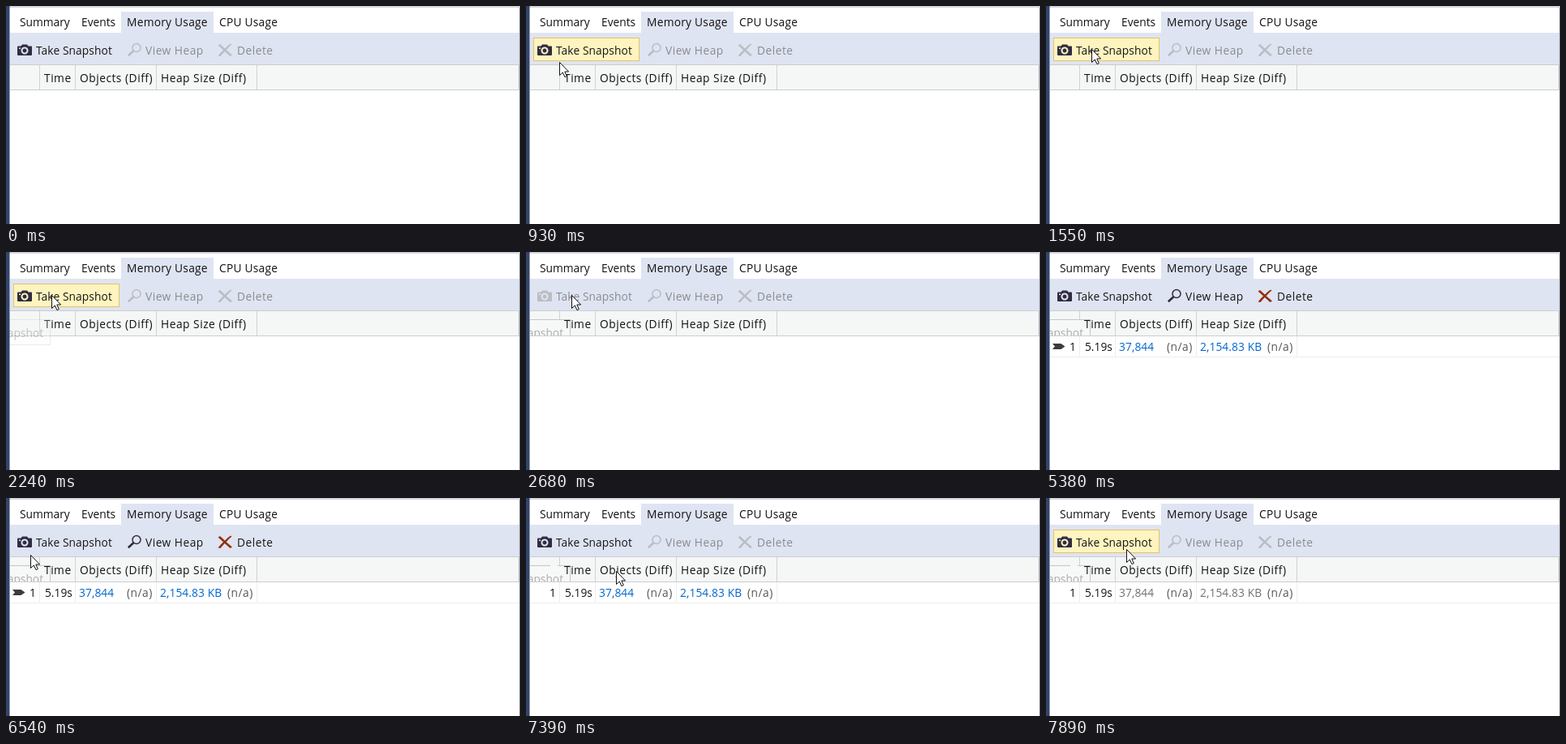
An HTML page for the animation above (7990 ms loop, 634 px wide and 269 px high).

```html
<!DOCTYPE html>
<html lang="en">
<head>
<meta charset="utf-8">
<title>Memory Usage</title>
<style>
  html, body { margin: 0; width: 100%; height: 100%; overflow: hidden; background: #fff; }
  svg { display: block; width: 634px; height: 269px; }
  text { font: 13.75px "Open Sans", "Noto Sans", sans-serif; fill: #111; white-space: pre; }
  .header text { letter-spacing: .52px; }
  .snug { letter-spacing: .1px; }
  .wide { letter-spacing: .25px; }
  .wider { letter-spacing: .5px; }
  .na { fill: #555; letter-spacing: .5px; }
  .link { fill: #717171; letter-spacing: .1px; }
  .live .link { fill: #0066cc; }

  .tool { --ink: #bbbdc4; }
  .tool text { fill: #8a8b90; }
  .tool.on { --ink: #302c42; }
  .tool.on text { fill: #161616; }
  .cross.on { --ink: #93300f; }
  .ink { fill: var(--ink); }
  .line { fill: none; stroke: var(--ink); }

  .button { fill: #fdf4bf; stroke: #e5c365; visibility: hidden; }
  .hover .button, .pressed .button { visibility: visible; }
  .pressed .button { fill: #fff29d; }

  .row, .mark, #tip, #trace, #cursor { visibility: hidden; }
  .filled .row, .selected .mark, .traced #trace { visibility: visible; }
  .wiped #gap { visibility: hidden; }
  .header .ghost { fill: #adadad; letter-spacing: 0; }
</style>
</head>
<body>
<svg id="stage" viewBox="0 0 634 269">
  <defs>
    <clipPath id="strip"><rect x="5" y="83" width="50" height="20"/></clipPath>
  </defs>
  <rect width="634" height="269" fill="#fff"/>
  <rect width="634" height="2" fill="#d3d4d9"/>

  <rect x="142" y="7" width="114" height="26" fill="#dfe4f2"/>
  <text x="17" y="25">Summary</text>
  <text x="93" y="25">Events</text>
  <text x="149" y="25" class="wide">Memory Usage</text>
  <text x="263" y="25" class="wide">CPU Usage</text>

  <rect x="5" y="33" width="628" height="39" fill="#dfe4f2"/>
  <rect class="button" x="9.5" y="39.5" width="130" height="28"/>

  <g class="tool" id="snap">
    <path class="ink" fill-rule="evenodd" d="M15 49.500H18.500L20 47.500H26L27.500 49.500H31Q32 49.500 32 50.500V60Q32 61 31 61H15Q14 61 14 60V50.500Q14 49.500 15 49.500ZM23 50.500a4.500 4.500 0 1 0 .01 0ZM23 52.500a2.500 2.500 0 1 1 -.01 0ZM16 51.500V53H18V51.500Z"/>
    <text x="37" y="60" class="snug">Take Snapshot</text>
  </g>
  <g class="tool" id="view">
    <circle class="line" cx="161" cy="51.500" r="5" stroke-width="1.500"/>
    <path class="line" d="M157.300 55.200L150.800 61.200" stroke-width="2.600"/>
    <text x="172" y="60" class="wider">View Heap</text>
  </g>
  <g class="tool cross" id="del">
    <path class="ink" d="M261.500 48.500L264 47L270 52.500Q273 49 277 46.500L278.500 47.500Q275 50 271.700 54.200L279 60.500L276.500 62L269.800 56Q267 59 264.500 62L261.500 61.500Q264 58 268 54.200Z"/>
    <text x="285" y="60" class="wider">Delete</text>
  </g>

  <g class="header">
    <rect x="5" y="72" width="628" height="32" fill="#cccdd2"/>
    <rect x="5" y="73" width="627" height="30" fill="#f5f7f7"/>
    <path d="M41.500 73V103M85.500 73V103M185.500 73V103M309.500 73V103" stroke="#cfd1d4"/>
    <g id="trace">
      <rect x="5" y="83" width="49" height="20" fill="#f7f8f8"/>
      <path d="M5 83.500H30M39 83.500H55M54.500 84V103" stroke="#c4c5c7"/>
      <path id="gap" d="M30 83.500H39" stroke="#c4c5c7"/>
      <g clip-path="url(#strip)"><text class="ghost" x="46" y="105" text-anchor="end">apshot</text></g>
    </g>
    <text x="47" y="94">Time</text>
    <text x="91" y="94">Objects (Diff)</text>
    <text x="191" y="94">Heap Size (Diff)</text>
  </g>

  <g class="row">
    <path d="M5 129.500H633M41.500 104V129M85.500 104V129M185.500 104V129M309.500 104V129" stroke="#ededee"/>
    <path class="mark" d="M8 113H18.500L23.500 116.500L18.500 120H8L11 116.500Z" fill="#3c3c3c"/>
    <text x="29" y="122">1</text>
    <text x="48" y="122">5.19s</text>
    <text x="90" y="122" class="link">37,844</text>
    <text x="149" y="122" class="na">(n/a)</text>
    <text x="190" y="122" class="link">2,154.83 KB</text>
    <text x="273" y="122" class="na">(n/a)</text>
  </g>

  <g id="tip">
    <rect x="-80.500" y="83.500" width="135" height="31" fill="#f9f9fa" stroke="#a8a8aa"/>
    <text x="46" y="105" text-anchor="end" fill="#555">Take Snapshot</text>
  </g>

  <rect width="4.500" height="269" fill="#34456c"/>
  <rect x="633" y="2" width="1" height="267" fill="#a9abb2"/>
  <path id="cursor" d="M.5 .5V16.500L4.300 13L7 18.700L9.300 17.600L6.800 12H11.600Z" fill="#fff" stroke="#111" stroke-linejoin="round"/>
</svg>
<script>
  const LOOP = 7990;
  const $ = id => document.getElementById(id);
  const stage = $('stage'), cursor = $('cursor'), tip = $('tip');

  // start, end, poses, from x y, to x y
  const moves = [
    [180, 720, 8, 271, 233, 38, 71],
    [880, 1090, 4, 41, 69, 48, 66],
    [1250, 1550, 5, 50, 65, 56, 53],
    [3270, 3430, 3, 55, 54, 54, 62],
    [4120, 4450, 5, 54, 62, 31, 61],
    [6540, 6920, 5, 30, 70, 90, 83],
    [7230, 7390, 3, 94, 84, 111, 90],
    [7600, 7890, 5, 110, 85, 99, 63]
  ];

  const within = (t, from, to = LOOP) => t >= from && t < to;

  function moveCursor(t) {
    const move = moves.filter(m => m[0] <= t).pop();
    const shown = move && !within(t, 4750, 6540);
    cursor.style.visibility = shown ? 'visible' : 'hidden';
    if (!shown) return;
    const [start, end, poses, x0, y0, x1, y1] = move;
    const last = poses - 1;
    const step = Math.min(last, Math.floor((t - start) / (end - start) * last + 1e-6));
    const p = step / last, k = start === 180 ? p * (2 - p) : p;
    const x = Math.round(x0 + (x1 - x0) * k), y = Math.round(y0 + (y1 - y0) * k);
    cursor.setAttribute('transform', `translate(${x} ${y})`);
  }

  function draw(t) {
    const selected = within(t, 5130, 6730);
    const states = {
      hover: within(t, 880, 2400) || t >= 7820,
      pressed: within(t, 2400, 2680),
      traced: t >= 2480,
      wiped: t >= 6620,
      filled: t >= 5130,
      live: within(t, 5380, 7440),
      selected
    };
    for (const name in states) stage.classList.toggle(name, states[name]);
    $('snap').classList.toggle('on', !within(t, 2680, 5130));
    $('view').classList.toggle('on', selected);
    $('del').classList.toggle('on', selected);

    tip.style.visibility = within(t, 2240, 2480) ? 'visible' : 'hidden';
    tip.style.opacity = t < 2300 ? .22 : t < 2400 ? .6 : .85;
    moveCursor(t);
  }

  function tick(now) {
    draw(now % LOOP);
    requestAnimationFrame(tick);
  }
  draw(0);
  requestAnimationFrame(tick);
</script>
</body>
</html>
```
